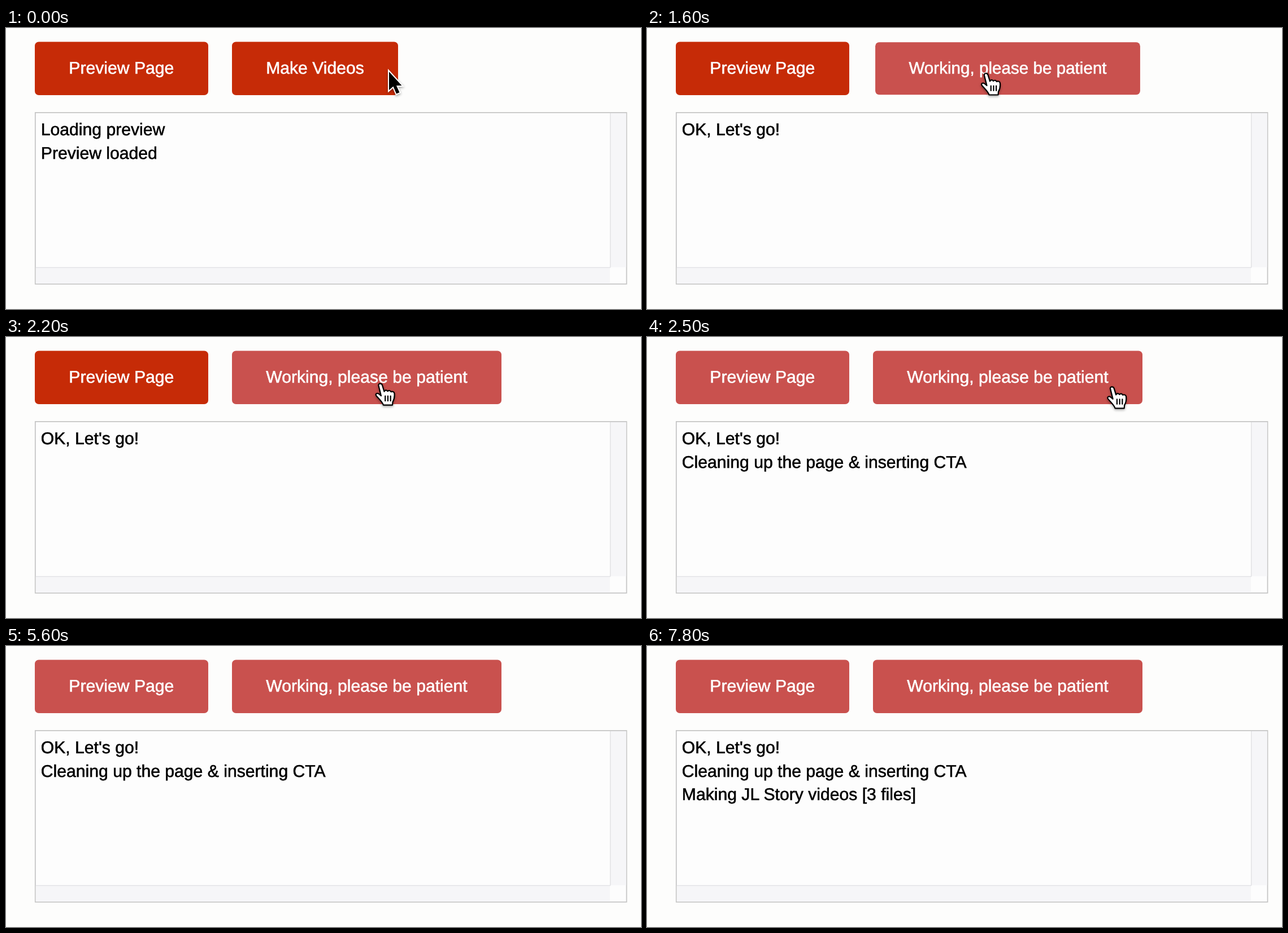
These frames come from a looping animation (1124x498 px, 8000 ms). An HTML page:

```html
<!DOCTYPE html>
<html lang="en">
<head>
<meta charset="utf-8">
<title>Make Videos</title>
<style>
  html, body { margin: 0; width: 100%; height: 100%; overflow: hidden; background: #fdfdfc; }
  svg { display: block; width: 1124px; height: 498px; }
  text {
    font: 30.15px "Liberation Sans", Helvetica, Arial, sans-serif;
    fill: #000; stroke: #000; stroke-width: .6; text-rendering: geometricPrecision;
  }
  .button rect { fill: #c62b07; }
  .button text { fill: #fff; stroke: #fff; text-anchor: middle; }
  .button.off rect { fill: #c9514e; }
  .track { fill: #f6f6f8; }
  .edge { fill: none; stroke: #e2e2e5; stroke-width: 1.5; }
  .frame { fill: #fdfdfd; stroke: #c3c3c3; stroke-width: 1.7; }
  #cursor { filter: drop-shadow(0 2px 2px rgba(0, 0, 0, .35)); }
  #arrow { fill: #000; stroke: #fff; stroke-width: 4; paint-order: stroke; }
  #hand { fill: #fff; stroke: #000; stroke-width: 2.2; stroke-linejoin: round; stroke-linecap: round; }
</style>
</head>
<body>
<svg viewBox="0 0 1124 498">
  <g class="button" id="preview">
    <rect x="51" y="24.5" width="307" height="94.5" rx="7"/>
    <text x="204.3" y="80.8">Preview Page</text>
  </g>
  <g class="button" id="make">
    <rect x="400" y="24.5" width="294" height="94.5" rx="7"/>
    <text y="80.8"></text>
  </g>

  <rect class="frame" x="51.8" y="150" width="1046.7" height="303.7"/>
  <path class="track" d="M1070 151h27.7v273h-27.7zM52.7 425h1016.3v28H52.7z"/>
  <path class="edge" d="M1069.7 151V424.5M52.7 424.5H1069.7"/>
  <g id="log">
    <text x="61.8" y="190.4"></text>
    <text x="61.8" y="231.9"></text>
    <text x="61.8" y="273.4"></text>
  </g>

  <g id="cursor">
    <path id="arrow" d="M0 0V32.5L7.5 26L13 39L18.5 36.7L13 24.5H22.5Z"/>
    <g id="hand">
      <path d="M7 5C6 1 12 0 13.5 4L17 15.5C18 12.5 22 12.5 23 15C25 13 28 13.5 29 16C31.5 14.5 35 16 35 19C35.5 24 35 29 32 34L31.5 39.5H15.5C14 34 8 29 3 23C.5 19.5 4.5 17 8 20L11.5 23Z"/>
      <path d="M18.8 23.5V32M23.5 23.5V32M28.2 23.5V32"/>
    </g>
  </g>
</svg>
<script>
  const LOOP = 8000, STEP = 100;
  const PRESS = 1500, CLICK = 1600, CLEAN = 2300, HIDE = 2900, STORY = 5900;
  const $ = id => document.getElementById(id);
  const [box, label] = $('make').children;
  const lines = [...$('log').children];

  const progress = (t, from, to) => Math.min(1, Math.max(0, (t - from) / (to - from)));
  const smooth = p => p * p * (3 - 2 * p);
  const mix = (a, b, p) => a + (b - a) * p;
  const show = (el, on) => el.style.display = on ? '' : 'none';

  function drawButtons(t) {
    const working = t >= CLICK;
    const width = working ? 477 : 294, mid = 400 + width / 2;
    const scale = t < PRESS ? 1 : mix(.98, 1, progress(t, PRESS, 2200));
    box.setAttribute('width', width);
    label.setAttribute('x', mid);
    label.textContent = working ? 'Working, please be patient' : 'Make Videos';
    $('make').setAttribute('transform',
      `translate(${mid} 71.7) scale(${scale}) translate(${-mid} -71.7)`);
    $('make').classList.toggle('off', working);
    $('preview').classList.toggle('off', t >= CLEAN);
  }

  function drawLog(t) {
    const log = t < CLICK
      ? ['Loading preview', 'Preview loaded']
      : ["OK, Let's go!",
         t >= CLEAN ? 'Cleaning up the page & inserting CTA' : '',
         t >= STORY ? 'Making JL Story videos [3 files]' : ''];
    lines.forEach((line, i) => line.textContent = log[i] || '');
  }

  function drawCursor(t) {
    const hand = t >= PRESS;
    const p = smooth(hand ? progress(t, 2000, 2600) : progress(t, 0, 300));
    const x = hand ? mix(590, 831, p) : mix(678, 600, p);
    const y = hand ? mix(79, 87.5, p) : mix(77.5, 84, p);
    $('cursor').setAttribute('transform', `translate(${x} ${y})`);
    show($('arrow'), !hand);
    show($('hand'), hand);
    show($('cursor'), t < HIDE);
  }

  let last = -1;
  function tick() {
    const t = Math.floor(performance.now() % LOOP / STEP) * STEP;
    if (t !== last) {
      drawButtons(t);
      drawLog(t);
      drawCursor(t);
      last = t;
    }
    requestAnimationFrame(tick);
  }
  tick();
</script>
</body>
</html>
```
